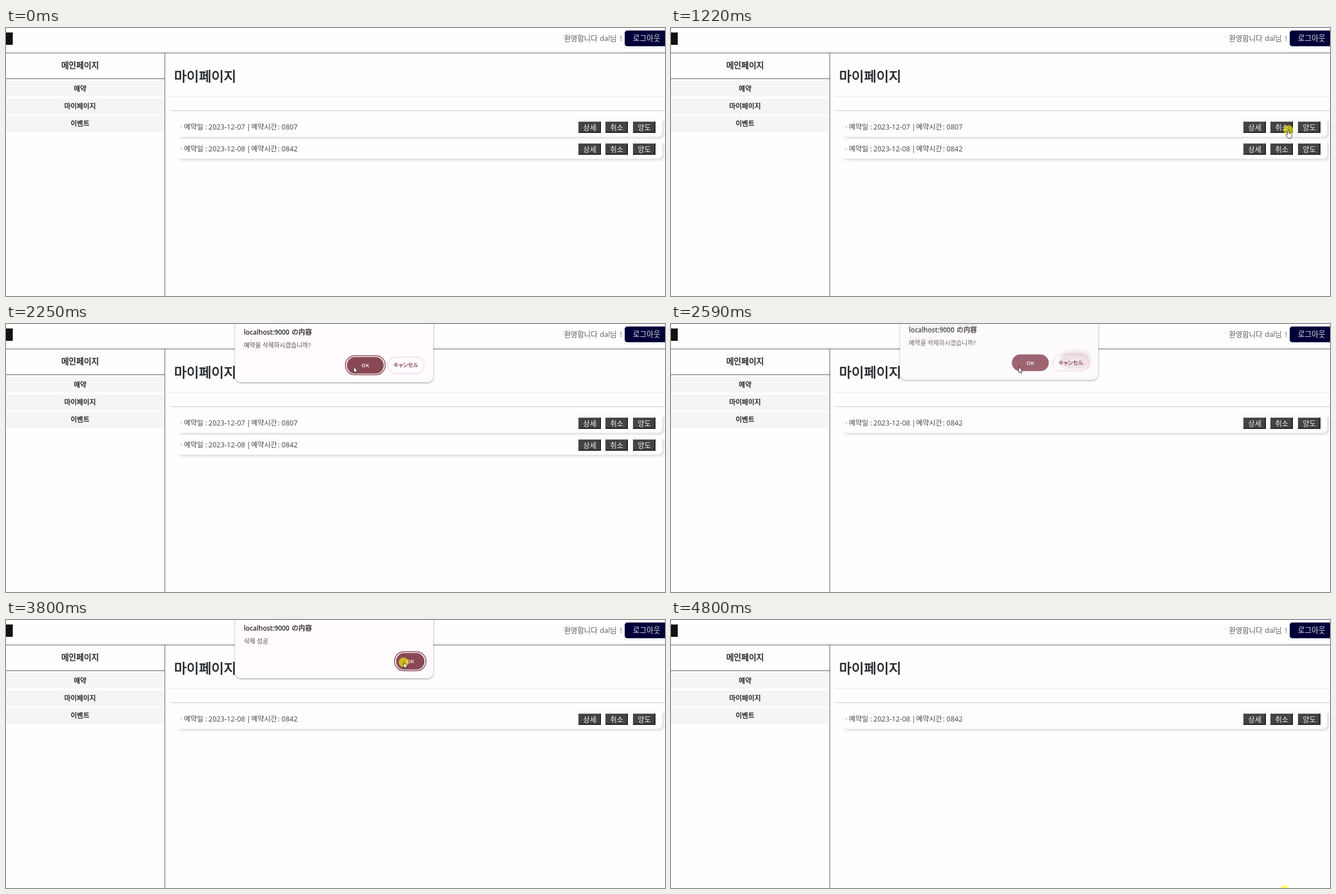
Recreate the animation shown at these times as an HTML page. Size 1172 by 478 pixels, loop 4.93 s.

```html
<!DOCTYPE html>
<html lang="ko">
<head>
<meta charset="utf-8">
<title>마이페이지</title>
<style>
  html, body { margin: 0; width: 100%; height: 100%; overflow: hidden; background: #fefefe; }
  svg { display: block; width: 100vw; height: 100vh; }
  text { font-family: 'Open Sans', 'Noto Sans CJK KR', 'Noto Sans CJK', sans-serif; white-space: pre; }
  .mid { text-anchor: middle; }
  .bold { font-weight: 600; }
  .semi { font-weight: 400; stroke-width: .032em; }
  .ja { font-family: 'Noto Sans CJK JP', 'Noto Sans CJK', sans-serif; }
</style>
</head>
<body>
<svg id="stage" viewBox="0 0 1172 478" xmlns="http://www.w3.org/2000/svg">
  <defs>
    <filter id="cardShadow" x="-5%" y="-30%" width="110%" height="170%">
      <feDropShadow dx="3" dy="3" stdDeviation="2" flood-color="#000" flood-opacity=".13"/>
    </filter>
    <filter id="boxShadow" x="-5%" y="-5%" width="110%" height="112%">
      <feDropShadow dx="0" dy="1" stdDeviation="1.4" flood-color="#000" flood-opacity=".45"/>
    </filter>
  </defs>
  <rect width="1172" height="478" fill="#fefefe"/>
  <g id="page"></g>
  <g id="dialogs"></g>
  <circle id="click" r="8.7" fill="#ff0" opacity=".6"/>
  <g id="cursor" fill="#fff" stroke="#222" stroke-width=".9" stroke-linejoin="round">
    <path id="arrow" d="M.4.4V10.8L2.8 8.6 4.4 12.2 6 11.5 4.4 8H7.6Z"/>
    <path id="hand" d="M-1.2 8V1.2Q-1.2 0 0 0T1.2 1.2V5.2L5.4 6.2Q6.8 6.8 6.5 8.6L5.9 12 5 14.4H-.6L-4.2 9.4Q-4.8 7.6-3.2 7.7Z"/>
  </g>
</svg>
<script>
const LOOP = 4930;
const WINE = '#86434f', WINE_HOVER = '#8a4855';
const $ = id => document.getElementById(id);

const rect = (x, y, w, h, fill, more = '') =>
  `<rect x="${x}" y="${y}" width="${w}" height="${h}" fill="${fill}" ${more}/>`;
const label = (x, y, size, fill, str, cls = '', more = '') =>
  `<text x="${x}" y="${y}" font-size="${size}" fill="${fill}" class="${cls}" ${more}>${str}</text>`;
// Medium weight: regular glyphs with a thin outline
const semi = (x, y, size, fill, str, cls = '', more = '') =>
  label(x, y, size, fill, str, 'semi ' + cls, `stroke="${fill}" ${more}`);

function smallButton(x, y, str) {
  return rect(x, y, 40, 20, '#000') + rect(x, y, 38.5, 18.5, '#4c4c4c') +
    rect(x + 1.5, y + 1.5, 37, 17, '#434343') +
    label(x + 20.2, y + 14.6, 12.6, '#f4f4f4', str, 'mid');
}

function booking(id, y, date, time) {
  const text = `· 예약일 : <tspan x="360">${date}</tspan><tspan x="428">|</tspan>` +
    `<tspan x="436">예약시간</tspan><tspan x="483.5">:</tspan><tspan x="490">${time}</tspan>`;
  return `<g id="${id}" transform="translate(0 ${y})">` +
    rect(303, 0, 864, 34, '#fefefe', 'rx="8" filter="url(#cardShadow)"') +
    label(310, 21.2, 12.5, '#444', text) +
    smallButton(1018, 7, '상세') + smallButton(1066, 7, '취소') + smallButton(1115, 7, '양도') + '</g>';
}

function okButton(name, x, w) {
  return rect(x - 2.7, 56.6, w + 5.4, 34, '#fff', `id="${name}Ring" rx="17" stroke="${WINE}" stroke-width="1.5"`) +
    rect(x, 58.8, w, 29.8, WINE, `id="${name}Ok" rx="14.9"`) +
    label(x + w / 2, 77.3, 9.7, '#fff', 'OK', 'mid bold');
}

function dialog(name, message, buttons) {
  return `<g id="${name}">` +
    rect(407.5, -40, 352.5, 144, '#fffbff', 'rx="11" filter="url(#boxShadow)"') +
    label(423, 19.4, 11.7, '#2b2529', 'localhost:9000', 'bold') +
    semi(508, 19.4, 12, '#2b2529', 'の内容', 'ja') +
    label(423, 42.3, 11, '#50484c', message) + buttons + '</g>';
}

const menu = ['예약', '마이페이지', '이벤트'].map((str, i) => {
  const y = 94.5 + i * 31.4;
  return rect(-5, y, 286, 27.6, '#f5f5f5', 'rx="4"') + semi(131.7, y + 18, 12.2, '#1c1c1c', str, 'mid');
}).join('');

$('page').innerHTML =
  rect(-10, 8, 22, 22, '#111') +
  label(992.5, 23, 12.9, '#5a5a5a', '환영합니다 <tspan x="1056">dal님</tspan><tspan x="1092">!</tspan>') +
  rect(1100.4, 4.4, 80, 28.2, '#000038', 'rx="4.5"') +
  label(1139.3, 23, 13.2, '#e4e4ec', '로그아웃', 'mid') +
  rect(0, 44, 1172, 1, '#5a5a62') + rect(282, 44, 1, 434, '#5a5a62') + rect(0, 90, 282, 1, '#5a5a62') +
  semi(131.7, 72.3, 14.6, '#1c1c1c', '메인페이지', 'mid') + menu +
  semi(299, 95.3, 24, '#212529', '마이페이지') +
  rect(291, 122, 881, 1, '#e7e7e7') + rect(291, 147, 881, 1, '#cacaca') +
  booking('first', 160, '2023-12-07', '0807') +
  booking('second', 199, '2023-12-08', '0842');

$('dialogs').innerHTML =
  dialog('ask', '예약을 삭제하시겠습니까?', okButton('ask', 606.2, 65.6) +
    rect(678.6, 59.2, 65.2, 29.2, '#fffbff', 'rx="14.6" stroke="#f3c3c9"') +
    semi(711, 77.3, 9.7, WINE, 'キャンセル', 'ja mid', 'style="font-feature-settings:\'palt\'"')) +
  dialog('done', '삭제 성공', okButton('done', 693.7, 50.6));

const CLOCK = [[0, 0], [1750, 26], [2250, 34], [LOOP, 74]];
// Pointer path: [tick, x, y, hand]
const PATH = [
  [2, 1040, 466, 0], [5, 1062, 360, 0], [9, 1110, 223, 0], [10, 1118, 214, 1], [12, 1114, 202, 0],
  [15, 1101, 185, 1], [16, 1098, 182, 1], [18, 1098, 182, 1], [23, 1093, 183, 1], [24, 930, 172, 0],
  [25, 753, 151, 0], [27, 680, 112, 0], [30, 632, 84, 0], [33, 618, 76, 0], [42, 618, 76, 0],
  [49, 694, 75, 0], [50, 697, 74, 0], [53, 703, 73, 0], [56, 703, 73, 0], [59, 715, 80, 0],
  [60, 741, 92, 1], [61, 880, 230, 0], [62, 1133, 462, 0], [72, 1091.5, 482, 0], [74, 1091.5, 482, 0]
];
const CLICKS = [18, 35, 56, 72];

// Linear lookup in rows of [key, ...values]; the row index comes last
function sample(rows, key) {
  let i = 0;
  while (i < rows.length - 2 && key >= rows[i + 1][0]) i++;
  const a = rows[i], b = rows[i + 1];
  const u = Math.min(1, Math.max(0, (key - a[0]) / (b[0] - a[0])));
  return a.map((v, j) => v + (b[j] - v) * u).concat(i);
}

const show = (id, on) => $(id).setAttribute('visibility', on ? 'inherit' : 'hidden');

function poseDialog(name, tick, opens, closes, hover) {
  let alpha = 0, dy = 0;
  const n = tick - closes + 1;
  if (n > 0) {
    alpha = Math.max(0, 1 - 0.045 * n ** 4);
    dy = -4.5 * n ** 1.35;
  } else if (tick >= opens) {
    const rest = 1 - Math.min(1, (tick - opens + 0.2) / 3);
    alpha = 1 - rest * rest;
    dy = -11 * rest * rest;
  }
  const box = $(name);
  box.setAttribute('opacity', alpha);
  box.setAttribute('transform', `translate(0 ${dy})`);
  show(name, alpha > 0);
  show(name + 'Ring', n <= 0);
  $(name + 'Ok').setAttribute('fill', tick >= hover ? WINE_HOVER : WINE);
}

function draw(ms) {
  const tick = Math.floor(sample(CLOCK, ms)[1] + 1e-6);
  const [, x, y, , row] = sample(PATH, tick);
  const at = `translate(${x} ${y})`;
  const hand = PATH[row][3] === 1;

  show('cursor', tick >= 2 && tick < 63);
  show('hand', hand);
  show('arrow', !hand);
  $('cursor').setAttribute('transform', at);
  $('click').setAttribute('transform', at);
  show('click', CLICKS.some(c => tick >= c && tick < c + 2));

  const deleted = tick >= 38;
  show('first', !deleted);
  $('second').setAttribute('transform', `translate(0 ${deleted ? 160 : 199})`);

  poseDialog('ask', tick, 20, 39, 33);
  poseDialog('done', tick, 39, 59, 52);
}

const start = performance.now();
function loop() {
  draw((performance.now() - start) % LOOP);
  requestAnimationFrame(loop);
}
loop();
</script>
</body>
</html>
```
